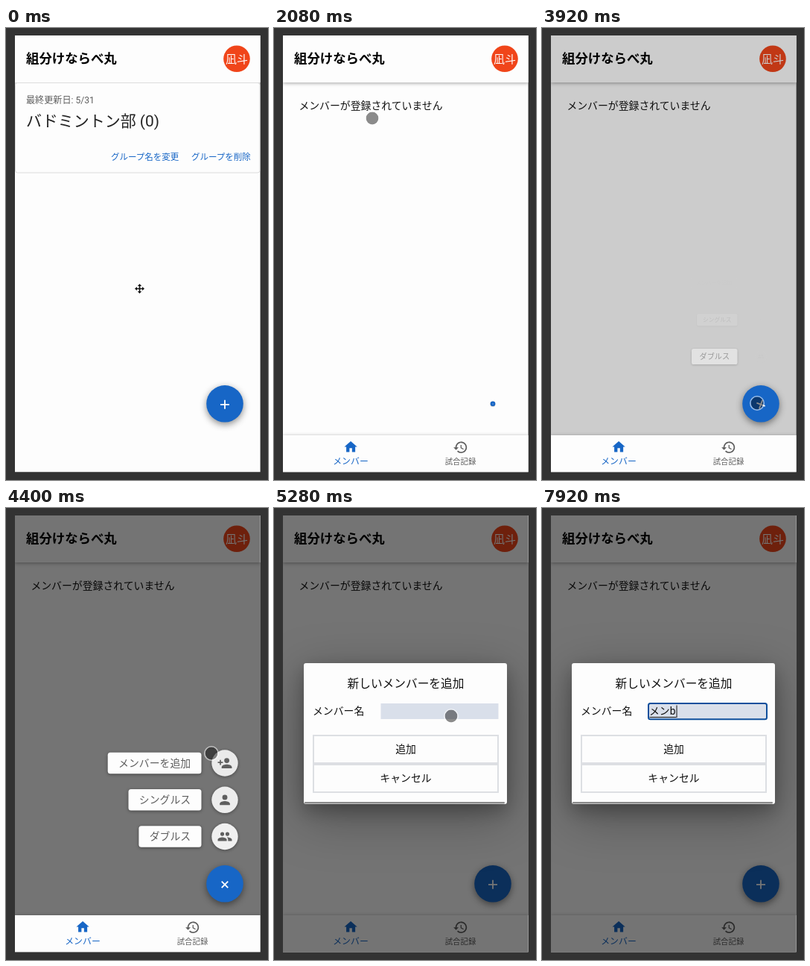
These frames come from a looping animation (352x606 px, 8000 ms). An HTML page:

```html
<!DOCTYPE html>
<html lang="ja">
<head>
<meta charset="utf-8">
<title>組分けならべ丸</title>
<style>
  html, body { margin: 0; width: 100%; height: 100%; overflow: hidden; background: #333; }
  svg { display: block; }
  text { font-family: Roboto, "Noto Sans CJK JP", "Noto Sans CJK", sans-serif; font-size: 13.87px; fill: #111; white-space: pre; }
  .mid { text-anchor: middle; }
  .blue { fill: #1766c6; }
  .grey { fill: #5e5e5e; }
  .paper { fill: #fdfdfd; }
  .bar { filter: drop-shadow(0 1px 2.5px rgba(0,0,0,.36)); }
  .chip { filter: drop-shadow(0 1.5px 2px rgba(0,0,0,.42)); }
  .raised { filter: drop-shadow(0 3px 5px rgba(0,0,0,.45)); }
  #dialog { filter: drop-shadow(0 9px 12px rgba(0,0,0,.25)) drop-shadow(0 16px 32px rgba(0,0,0,.3)); }
  .button { fill: none; stroke: #dddfe3; stroke-width: 2; }
</style>
</head>
<body>
<svg width="352" height="606" viewBox="0 0 352 606">
  <defs>
    <clipPath id="screen"><rect x="12" y="10" width="329.6" height="585.3"/></clipPath>
    <path id="home" d="M10 20v-6h4v6h5v-8h3L12 3 2 12h3v8z"/>
    <path id="history" d="M13 3c-4.97 0-9 4.03-9 9H1l3.89 3.89.07.14L9 12H6c0-3.87 3.13-7 7-7s7 3.13 7 7-3.13 7-7 7c-1.93 0-3.68-.79-4.94-2.06l-1.42 1.42C8.27 19.99 10.51 21 13 21c4.97 0 9-4.03 9-9s-4.03-9-9-9zm-1 5v5l4.28 2.54.72-1.21-3.5-2.08V8z"/>
    <path id="person" d="M12 12a4 4 0 1 0 0-8 4 4 0 0 0 0 8zm0 2c-2.67 0-8 1.34-8 4v2h16v-2c0-2.66-5.33-4-8-4z"/>
    <g id="personAdd"><use href="#person" x="3"/><path d="M6 10V7H4v3H1v2h3v3h2v-3h3v-2z"/></g>
    <path id="group" d="M16 11a3 3 0 1 0 0-6 3 3 0 0 0 0 6zm-8 0a3 3 0 1 0 0-6 3 3 0 0 0 0 6zm0 2c-2.33 0-7 1.17-7 3.5V19h14v-2.5c0-2.33-4.67-3.5-7-3.5zm8 0c-.29 0-.62.02-.97.05 1.16.84 1.97 1.97 1.97 3.45V19h6v-2.5c0-2.33-4.67-3.5-7-3.5z"/>
  </defs>

  <rect width="352" height="606" fill="#333"/>
  <g clip-path="url(#screen)">
    <rect class="paper" x="12" y="10" width="330" height="586"/>
    <rect class="paper bar" x="12" y="0" width="330" height="73"/>
    <text x="27" y="47.3" font-weight="700" style="font-size:17.4px;fill:#000">組分けならべ丸</text>
    <circle cx="310" cy="41.3" r="17.8" fill="#f0451a"/>
    <text class="mid" x="310" y="47" style="font-size:15px;fill:#fff">凪斗</text>

    <g id="listPage">
      <rect class="paper" x="12.5" y="73.5" width="328.5" height="120.5" rx="3" stroke="#dcdcdc"/>
      <text class="grey" x="27" y="101.3" style="font-size:12.1px">最終更新日: 5/31</text>
      <text x="27" y="132" style="font-size:21px;fill:#222">バドミントン部 (0)</text>
      <text class="blue" x="141" y="177.2" style="font-size:11.5px">グループ名を変更</text>
      <text class="blue" x="249" y="177.2" style="font-size:11.5px">グループを削除</text>
    </g>

    <text id="empty" x="33.4" y="109">メンバーが登録されていません</text>
    <rect id="dialDim" x="12" y="10" width="330" height="586"/>

    <g id="nav">
      <rect class="paper bar" x="12" y="546" width="330" height="60"/>
      <use class="blue" href="#home" transform="translate(92.8 551.3) scale(.86)"/>
      <text class="blue mid" x="103" y="585" style="font-size:11.9px">メンバー</text>
      <use class="grey" href="#history" transform="translate(240.3 552) scale(.86)"/>
      <text class="grey mid" x="250.5" y="584.5" style="font-size:10.4px">試合記録</text>
    </g>

    <g id="actions"></g>
    <g id="fab">
      <circle class="raised blue" r="24.8"/>
      <path id="plus" d="M-6 0H6M0-6V6" stroke="#fff" stroke-width="1.8"/>
    </g>
    <rect id="dialogDim" x="12" y="10" width="330" height="586"/>

    <g id="dialog">
      <rect class="paper" x="40" y="208" width="273" height="189" rx="3"/>
      <rect x="41" y="394" width="269" height="2.6" rx="1" fill="#8b8b8b"/>
      <text class="mid" x="177" y="241.3" style="font-size:15.7px">新しいメンバーを追加</text>
      <text x="52" y="277.2">メンバー名</text>
      <rect x="143.5" y="262" width="158" height="21" fill="#d9dfea"/>
      <rect id="focus" x="143" y="262" width="159" height="21.3" rx="2.5" fill="none" stroke="#0f4f9c" stroke-width="2"/>
      <text id="typed" x="144" y="277.2"></text>
      <path id="underline" stroke="#111"/>
      <path id="caret" stroke="#111"/>
      <rect class="button" x="53" y="305" width="248" height="37"/>
      <rect class="button" x="53" y="344" width="248" height="37"/>
      <text class="mid" x="177" y="328.3">追加</text>
      <text class="mid" x="177" y="366.8">キャンセル</text>
    </g>
  </g>

  <g id="moveCursor" transform="translate(179.5 349.5)">
    <path d="M-5 0H5M0-5V5" stroke="#111" stroke-width="1.6"/>
    <path d="M0-6.5l2.6 3h-5.2zM0 6.5l2.6-3h-5.2zM-6.5 0l3-2.6v5.2zM6.5 0l-3-2.6v5.2z" fill="#111"/>
  </g>
  <g id="touch">
    <circle r="8.4" fill="#000" fill-opacity=".45"/>
    <circle r="9.2" fill="none" stroke="#fff" stroke-opacity=".55" stroke-width="1.6"/>
  </g>
</svg>
<script>
const LOOP = 8000, STEP = 80;
const PAGE = 2000, DIAL_OPEN = 3853, DIAL_CLOSE = 4880, FOCUS = 5680, DIM = .54;
const $ = id => document.getElementById(id);
const clamp = v => Math.max(0, Math.min(1, v));
const show = (id, on) => { $(id).style.display = on ? '' : 'none'; };

// cubic-bezier(.4, 0, .2, 1)
function ease(p) {
  if (p <= 0) return 0;
  if (p >= 1) return 1;
  let lo = 0, hi = 1, u;
  for (let i = 0; i < 20; i++) {
    u = (lo + hi) / 2;
    const x = 1.2 * u * (1 - u) ** 2 + .6 * u * u * (1 - u) + u ** 3;
    if (x < p) lo = u; else hi = u;
  }
  return u * u * (3 - 2 * u);
}
const pulse = (t, on, off, time) => ease((t - on) / time) - ease((t - off) / time);

// Pointer stops: time, x, y
const stops = [
  [80, 179, 349], [880, 145, 128], [1440, 143, 123], [1800, 143, 123], [2080, 132, 121],
  [2400, 132, 121], [3040, 248, 391], [3480, 288, 502], [3920, 289, 503], [4400, 276, 329],
  [4640, 284, 339], [4880, 284, 339], [5280, 238, 279], [5600, 222, 273], [6560, 222, 273],
  [7120, 144.5, 294.5], [7280, 144.5, 294.5]
];

function slope(i, k) {
  const a = stops[i - 1], b = stops[i], c = stops[i + 1];
  if (!a || !c) return 0;
  const before = (b[k] - a[k]) / (b[0] - a[0]), after = (c[k] - b[k]) / (c[0] - b[0]);
  return before * after > 0 ? 2 * before * after / (before + after) : 0;
}

function pointer(t, k) {
  const i = Math.max(0, stops.findIndex(s => s[0] > t) - 1);
  const a = stops[i], b = stops[i + 1], span = b[0] - a[0], p = clamp((t - a[0]) / span), q = 1 - p;
  return a[k] * q * q * (1 + 2 * p) + b[k] * p * p * (1 + 2 * q)
    + span * p * q * (slope(i, k) * q - slope(i + 1, k) * p);
}

const actions = [['ダブルス', 'group', 440.5], ['シングルス', 'person', 391.3], ['メンバーを追加', 'personAdd', 342]];
$('actions').innerHTML = actions.map(([label, icon]) => {
  const width = label.length * 13.9 + 28.5;
  return `<g><g><rect class="paper chip" x="${-width}" y="-14.3" width="${width}" height="28.6" rx="3.5"/>
    <text class="grey mid" x="${-width / 2}" y="4.8">${label}</text></g>
    <g><circle class="chip" r="17.7" fill="#fafafa"/>
    <use class="grey" href="#${icon}" transform="translate(-10.3 -10.3) scale(.86)"/></g></g>`;
}).join('');
const actionNodes = [...$('actions').children];

function drawActions(t) {
  actionNodes.forEach((node, i) => {
    const on = DIAL_OPEN + i * 30, off = DIAL_CLOSE + (2 - i) * 30;
    const grow = pulse(t, on, off, 200), [label, button] = node.children;
    const fade = ease((t - on) / 800) * (1 - ease((t - off) / 200));
    node.style.display = grow > 0 ? '' : 'none';
    label.setAttribute('transform', `translate(262.5 ${actions[i][2]}) scale(${.5 + grow / 2})`);
    label.style.opacity = grow;
    button.setAttribute('transform', `translate(294 ${actions[i][2]}) scale(${grow})`);
    button.style.opacity = fade;
  });
}

const typing = ['', 'm', 'め', 'めn', 'めん', 'めんb', 'メンb'];

function drawInput(t) {
  const word = typing[Math.max(0, Math.min(6, Math.floor((t - 7440) / 80)))];
  show('focus', t >= FOCUS);
  $('typed').textContent = word;
  const end = 145 + (word ? $('typed').getComputedTextLength() : 0);
  $('underline').setAttribute('d', word ? `M144.5 280.5H${end}` : '');
  $('caret').setAttribute('d', `M${end + .5} 264.5V281`);
  show('caret', t >= FOCUS && (word || Math.floor((t - FOCUS) / 480) % 2 === 0));
}

function draw(t) {
  const members = t >= PAGE;
  show('listPage', !members);
  show('empty', members);
  show('nav', members);

  const dialog = ease((t - 4890) / 225);
  $('dialDim').style.opacity = DIM * pulse(t, DIAL_OPEN, DIAL_CLOSE, 225);
  $('dialogDim').style.opacity = DIM * dialog;

  const zoom = members ? ease((t - 2035) / 225) : 1;
  $('fab').setAttribute('transform', `translate(294 503.8) scale(${zoom})`);
  $('plus').setAttribute('transform', `translate(0 1) rotate(${45 * pulse(t, DIAL_OPEN, DIAL_CLOSE, 200)})`);

  drawActions(t);
  show('dialog', dialog > 0);
  $('dialog').style.opacity = dialog;
  drawInput(t);

  show('moveCursor', t < 80);
  show('touch', t >= 80 && t < 7280);
  if (t < 7280) $('touch').setAttribute('transform', `translate(${pointer(t, 1)} ${pointer(t, 2)})`);
}

function tick() {
  draw(Math.floor(performance.now() % LOOP / STEP) * STEP);
  requestAnimationFrame(tick);
}
tick();
</script>
</body>
</html>
```
